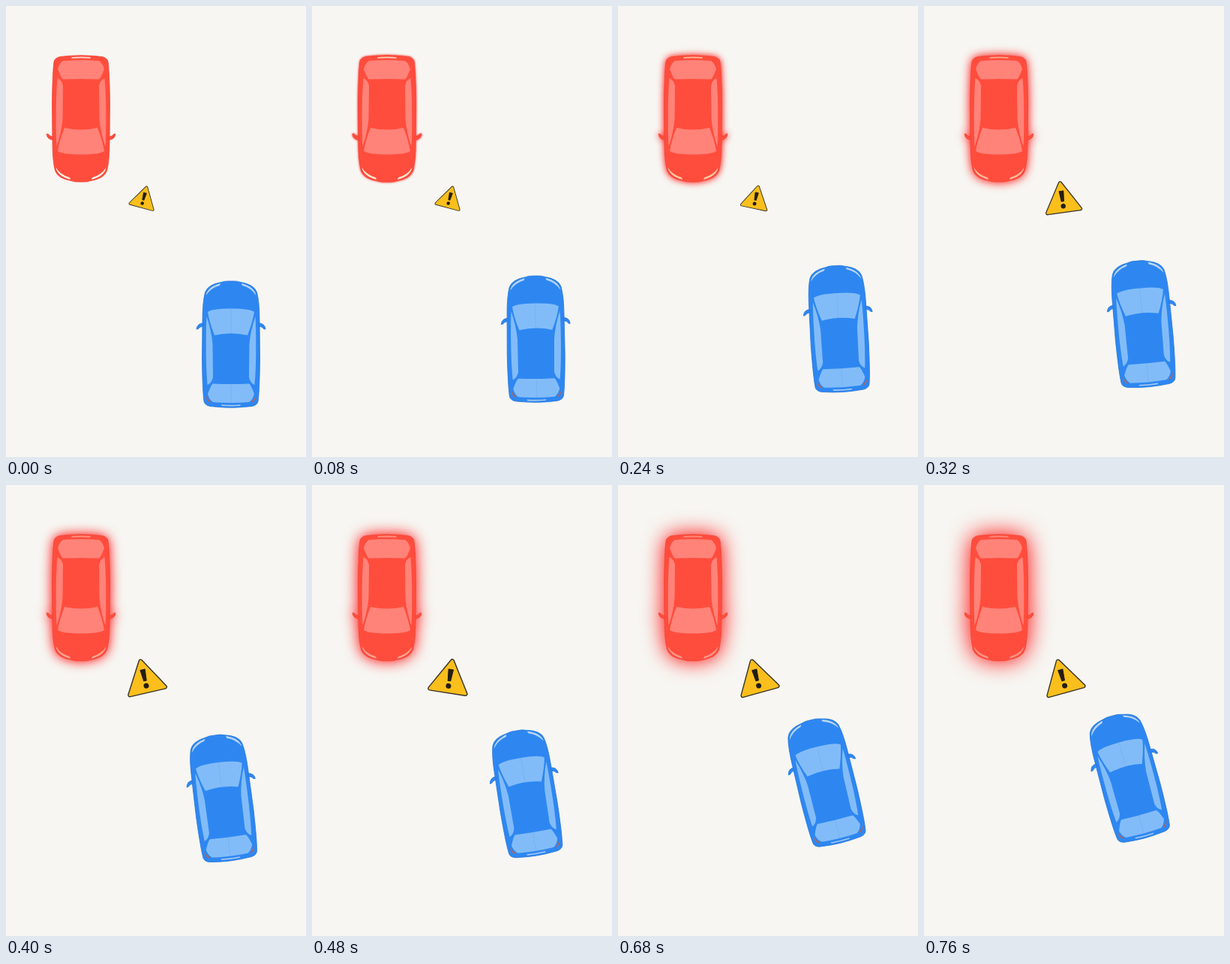
Recreate the animation shown at these times as an HTML page. Size 400 by 600 pixels, loop 800 ms.

```html
<!DOCTYPE html>
<html lang="en">
<head>
<meta charset="utf-8">
<title>Two cars</title>
<style>
  html, body { margin: 0; width: 100%; height: 100%; overflow: hidden; background: #f7f6f2; }
  svg { display: block; }
  .red { --body: #ff4d3d; --edge: #f24435; --glass: #ff8379; --seam: none; --tail: none; }
  .blue { --body: #2e87f1; --edge: #2877d8; --glass: #82bcf8; --seam: #74b0ee; --tail: #b0645f; --lamp: #bcd7f2; }
</style>
</head>
<body>
<svg width="400" height="600" viewBox="0 0 400 600">
  <defs>
    <g id="half">
      <path d="M37-28Q45-28 46-20L43.500-20.500Q42-23.500 37-24Z" fill="var(--body)" stroke="var(--edge)" stroke-width=".8"/>
      <path d="M32.500-37Q26-18 24.500 0L24 44Q26 52 31.500 54Q33.500 30 33.300 0Q33.300-25 32.500-37Z" fill="var(--glass)"/>
      <path d="M33.500-65Q31-76.500 14-81L15-78.300Q27-75 33.500-65Z" fill="var(--lamp)"/>
      <path d="M34 68Q33 75 27.500 78L28 75.500Q31.500 73 34 68Z" fill="var(--tail)"/>
    </g>
    <g id="car">
      <path d="M0-84Q8-84.500 13-82.500Q31-79.500 34.500-69Q38-56 38-30L38.500 20Q38 62 36 76Q35 81 28 82.500Q12 84.300 0 84.300Q-12 84.300-28 82.500Q-35 81-36 76Q-38 62-38.500 20L-38-30Q-38-56-34.500-69Q-31-79.500-13-82.500Q-8-84.500 0-84Z"
        fill="var(--body)" stroke="var(--edge)" stroke-width=".8"/>
      <use href="#half"/>
      <use href="#half" transform="scale(-1 1)"/>
      <path d="M-31-43Q-25-47.500 0-47.500Q25-47.500 31-43Q29-30 22-12Q0-17-22-12Q-29-30-31-43Z" fill="var(--glass)"/>
      <path d="M-24 52.500Q0 53.500 24 52.500Q26 53 31 66Q29 74 24 77Q0 79-24 77Q-29 74-31 66Q-26 53-24 52.500Z" fill="var(--glass)"/>
      <path d="M0-47V-15M0 53V78" stroke="var(--seam)" stroke-width=".7"/>
      <path d="M-13 80.300Q0 81.300 13 80.300L12 82Q0 82.800-12 82Z" fill="var(--lamp)" opacity=".85"/>
    </g>
  </defs>
  <g id="parked" class="red"><use href="#car" transform="translate(100 150) rotate(180)"/></g>
  <g id="sign" stroke-linejoin="round">
    <path d="M0-20L24 20.500H-24Z" fill="none" stroke="#37322a" stroke-width="6"/>
    <path d="M0-20L24 20.500H-24Z" fill="#fabf1c" stroke="#fabf1c" stroke-width="3.200"/>
    <path d="M-3.200-8.500H3.200L1.800 6.500H-1.800Z" fill="#241d12" stroke="#241d12"/>
    <circle cy="13.500" r="3.500" fill="#241d12"/>
  </g>
  <g id="moving" class="blue"><use href="#car"/></g>
</svg>
<script>
  const LOOP = 800, STEP = 40;
  const parked = document.getElementById('parked');
  const sign = document.getElementById('sign');
  const moving = document.getElementById('moving');

  // Each key: time in ms, then values
  const wobble = [[0, 15, .65], [205, 15, .65], [375, -15, 1], [525, 15, 1], [680, -15.5, 1], [800, -15.5, 1]];
  const lamp = [[0, 255, 243, 236], [160, 255, 224, 176], [400, 255, 165, 148], [800, 255, 148, 136]];

  const linear = x => x;
  const sine = x => (1 - Math.cos(Math.PI * x)) / 2;

  function tween(keys, ms, ease) {
    const i = keys.findIndex(key => key[0] > ms);
    const from = keys[i - 1], to = keys[i];
    const k = ease((ms - from[0]) / (to[0] - from[0]));
    return from.slice(1).map((v, j) => v + (to[j + 1] - v) * k);
  }

  function draw(ms) {
    const t = ms / 1000;

    parked.style.filter = t ? `drop-shadow(0 0 ${20 * t}px #f00)` : 'none';
    parked.style.setProperty('--lamp', `rgb(${tween(lamp, ms, linear)})`);

    const [tilt, size] = tween(wobble, ms, sine);
    sign.setAttribute('transform', `translate(184 254) rotate(${tilt}) scale(${size})`);

    const x = 300 - 17 * t - 25 * t * t;
    const y = 450 - 88 * t + 9 * t * t;
    const turn = 5.7 * t + 43.9 * t * t - 33 * t ** 3;
    moving.setAttribute('transform', `translate(${x} ${y}) rotate(${-turn})`);
  }

  const start = performance.now();
  function tick() {
    const ms = (performance.now() - start) % LOOP;
    draw(Math.floor(ms / STEP) * STEP);
    requestAnimationFrame(tick);
  }
  tick();
</script>
</body>
</html>
```
